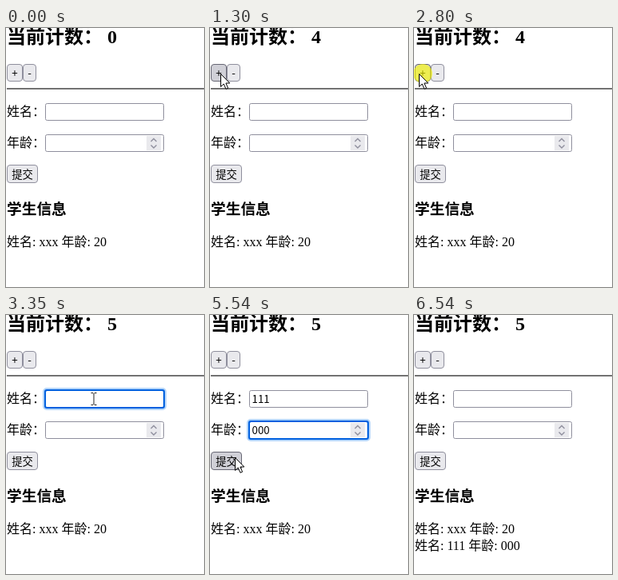
Recreate the animation shown at these times as an HTML page. Size 248 by 324 pixels, loop 7030 ms.

```html
<!DOCTYPE html>
<html lang="zh-CN">
<head>
<meta charset="utf-8">
<title>学生信息</title>
<style>
  html, body { margin: 0; width: 100%; height: 100%; overflow: hidden; background: #fff; }
  svg { display: block; width: 248px; height: 324px; }
  text { font: 16px "Liberation Serif", "Noto Sans CJK SC", "Noto Sans CJK", serif; white-space: pre; }
  .h2 { font-size: 24px; font-weight: 700; }
  .h3 { font-size: 18.72px; font-weight: 700; }
  .ui { font: 13.333px "Noto Sans CJK SC", "Noto Sans CJK", sans-serif; }
  .button rect { fill: #e9e9ed; stroke: #8f8f9d; }
  .button.hover rect { fill: #d0d0d7; stroke: #676774; }
  .button text { text-anchor: middle; }
  .box { fill: #fff; stroke: #8f8f9d; }
  .hover .box { stroke: #676774; }
  .ring, .focus .box { display: none; }
  .focus .ring { display: inline; }
  .spin path { fill: none; stroke: #8f8f9d; stroke-width: 1.4; }
</style>
</head>
<body>
<svg viewBox="0 0 248 324">
  <text class="h2" x="1" y="19">当前计数： <tspan id="count">0</tspan></text>
  <g id="buttons"></g>
  <path d="M1 75.5H248" stroke="#666"/>
  <path d="M1 76.5H248" stroke="#808080"/>
  <text x="1" y="110">姓名：</text>
  <text x="1" y="149">年龄：</text>
  <g id="fields"></g>
  <g class="spin">
    <rect x="176" y="135" width="18" height="18" fill="#e9e9ed"/>
    <path d="M181.5 142l3.5 -3.5 3.5 3.5M181.5 146.5l3.5 3.5 3.5 -3.5"/>
  </g>
  <text class="h3" x="1" y="233">学生信息</text>
  <text x="1" y="273">姓名: xxx 年龄: 20</text>
  <text id="added" x="1" y="294">姓名: 111 年龄: 000</text>
  <circle id="spot" r="12" fill="#ff0" fill-opacity=".62"/>
  <g id="pointer">
    <path id="arrow" d="M.5 .5V16.5L4.2 13 7 19.3 9.6 18.2 6.9 12H11.8Z" fill="#fff" stroke="#000"/>
    <path id="beam" d="M-3.5 -7.5H-1L0 -6.5 1 -7.5H3.5M-3.5 7.5H-1L0 6.5 1 7.5H3.5M0 -6.5V6.5" fill="none" stroke="#222"/>
  </g>
</svg>
<script>
const LOOP = 7030;
const $ = id => document.getElementById(id);

// Pointer positions: time, x, y
const PATH = [
  [20, 186, 271], [140, 160, 235], [300, 88, 150], [460, 32, 70], [570, 8, 40], [710, 9, 56],
  [1260, 9, 57], [1300, 13, 57], [1430, 23, 59], [1580, 27, 60], [2040, 27, 60],
  [2120, 21, 60], [2270, 8, 57], [2800, 6, 57], [2940, 7, 57], [3060, 40, 72],
  [3220, 110, 105], [4050, 110, 105], [4300, 114, 136], [5120, 114, 136],
  [5470, 31, 178], [5910, 31, 178], [6040, 44, 164], [6260, 110, 212], [6540, 192, 322]
];
const PLUS = [840, 980, 1120, 1260, 2480, 2630, 2780, 2930];
const MINUS = [1690, 1840, 1990];
const SUBMIT = 5650;
const NAME_FOCUS = 3260, AGE_FOCUS = 4370;

// Click highlights: start, x, y
const SPOTS = [
  ...PLUS.map(t => [t - 60, 11, 57]),
  ...MINUS.map(t => [t - 60, 31, 60]),
  [3230, 110, 105], [4330, 112, 135], [5580, 33, 178]
];
const SPOT_TIME = 90;

const buttons = [
  { x: 1, y: 45, w: 20, h: 22, label: '+' },
  { x: 21, y: 45, w: 17, h: 22, label: '-' },
  { x: 1, y: 171, w: 39, h: 23, label: '提交' }
];
const fields = [
  { x: 49, y: 94, w: 149, h: 22, char: '1', keys: [3750, 3870, 3990], focus: [NAME_FOCUS, AGE_FOCUS] },
  { x: 49, y: 133, w: 149, h: 22, char: '0', keys: [4820, 4940, 5060], focus: [AGE_FOCUS, SUBMIT] }
];

const rect = ({ x, y, w, h }, pad, r, attrs) =>
  `<rect x="${x - pad}" y="${y - pad}" width="${w + 2 * pad}" height="${h + 2 * pad}" rx="${r}" ${attrs}/>`;

$('buttons').innerHTML = buttons.map(b =>
  `<g class="button">${rect(b, -.5, 3.5, '')}
   <text class="ui" x="${b.x + b.w / 2}" y="${b.y + (b.h > 22 ? 17 : 16)}">${b.label}</text></g>`).join('');

$('fields').innerHTML = fields.map(f =>
  `<g>${rect(f, -.5, 2, 'class="box"')}
   <g class="ring">${rect(f, 3, 5, 'fill="#b3d5fa"')}${rect(f, 1, 3, 'fill="#0060df"')}${rect(f, -1, 1.5, 'fill="#fff"')}</g>
   <text class="ui" x="52.5" y="${f.y + 16}"></text></g>`).join('');

buttons.forEach((b, i) => b.node = $('buttons').children[i]);
fields.forEach((f, i) => f.node = $('fields').children[i]);

const passed = (times, t) => times.filter(v => v <= t).length;
const inside = (p, b) => p && p[0] >= b.x && p[0] < b.x + b.w && p[1] >= b.y && p[1] < b.y + b.h;
const show = (node, on) => node.style.display = on ? 'inline' : 'none';
const move = (node, [x, y]) => node.setAttribute('transform', `translate(${x} ${y})`);

function pointerAt(t) {
  const i = PATH.findIndex(p => p[0] > t);
  if (i < 1) return null;
  const [t0, x0, y0] = PATH[i - 1], [t1, x1, y1] = PATH[i];
  const k = (t - t0) / (t1 - t0);
  return [Math.round(x0 + (x1 - x0) * k), Math.round(y0 + (y1 - y0) * k)];
}

function render(t) {
  const p = pointerAt(t);
  $('count').textContent = passed(PLUS, t) - passed(MINUS, t);
  show($('added'), t >= SUBMIT);

  for (const b of buttons) b.node.classList.toggle('hover', !!inside(p, b));
  for (const f of fields) {
    f.node.classList.toggle('hover', !!inside(p, f));
    f.node.classList.toggle('focus', t >= f.focus[0] && t < f.focus[1]);
    f.node.lastElementChild.textContent = t < SUBMIT ? f.char.repeat(passed(f.keys, t)) : '';
  }

  const spot = SPOTS.find(s => t >= s[0] && t < s[0] + SPOT_TIME);
  show($('spot'), spot);
  if (spot) move($('spot'), spot.slice(1));

  const typing = fields.some(f => inside(p, f));
  show($('pointer'), p);
  show($('arrow'), !typing);
  show($('beam'), typing);
  if (p) move($('pointer'), p);
}

const start = performance.now();
function tick() {
  render((performance.now() - start) % LOOP);
  requestAnimationFrame(tick);
}
tick();
</script>
</body>
</html>
```
